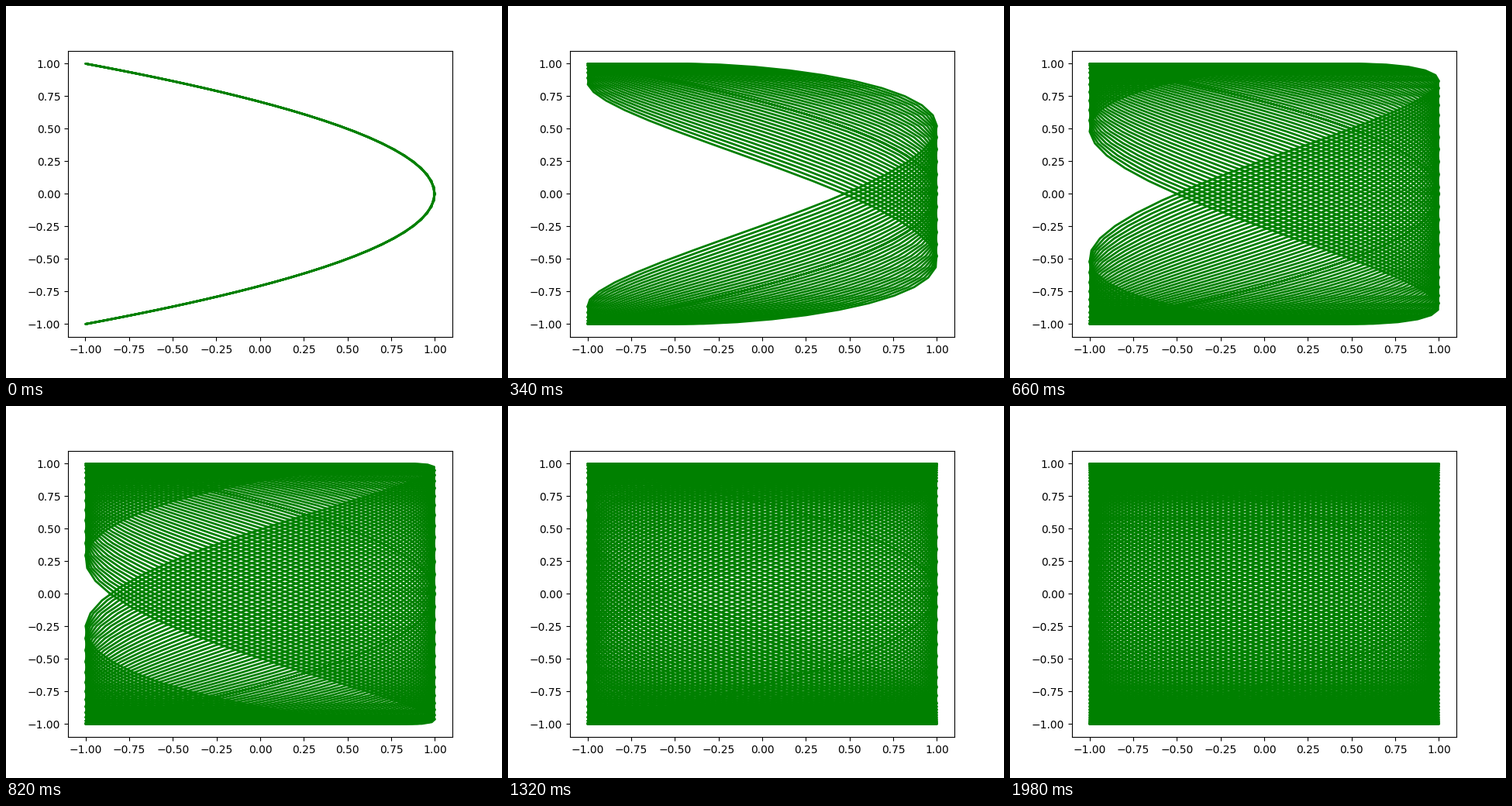
Animation, 640 px wide and 480 px high, one loop 2000 ms. Source, as a matplotlib script:

```python
import numpy as np
import matplotlib.pyplot as plt
from matplotlib.animation import FuncAnimation

FRAMES = 100
INTERVAL = 20
MARGIN = 0.05

t = np.linspace(0, 2 * np.pi, 64)
y = np.sin(t)
phases = np.linspace(0, 2 * np.pi, FRAMES)
curves = np.cos(2 * t + phases[:, None])

# The view grows with the curves drawn so far.
low = np.minimum.accumulate(curves.min(axis=1))
high = np.maximum.accumulate(curves.max(axis=1))


def padded(a, b):
    pad = MARGIN * (b - a)
    return a - pad, b + pad


fig, ax = plt.subplots(figsize=(6.4, 4.8), dpi=100)


def add_curve(x):
    return ax.plot(x, y, color="g", lw=2, visible=False)[0]


# The opening curve is laid down twice, which firms up its edges.
base = add_curve(curves[0])
base.set_visible(True)
lines = [add_curve(x) for x in curves]
ax.set_ylim(*padded(y.min(), y.max()))


def update(i):
    for k, line in enumerate(lines):
        line.set_visible(k <= i)
    ax.set_xlim(*padded(low[i], high[i]))
    return lines


anim = FuncAnimation(fig, update, frames=FRAMES, interval=INTERVAL,
                     repeat=True, repeat_delay=0, blit=False)
plt.show()
```
